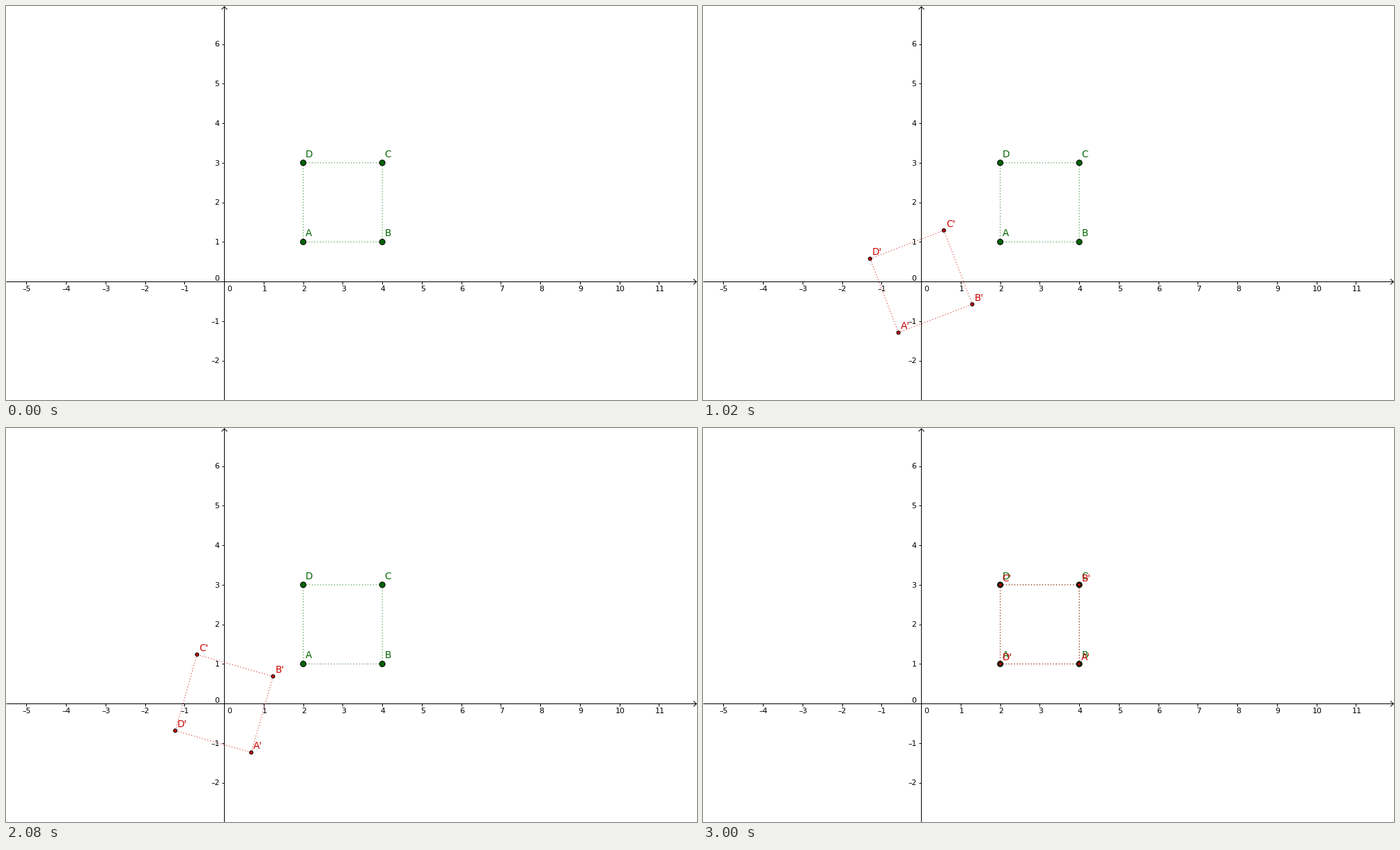
These frames come from a looping animation (992x565 px, 3.02 s). A matplotlib script:

```python
import numpy as np
import matplotlib.pyplot as plt
from matplotlib.animation import FuncAnimation
from matplotlib.patches import Circle

W, H, DPI = 992, 565, 64
PX = 72 / DPI                      # one pixel in points
OX, OY, UNIT = 313.2, 395.1, 56.75
GREEN, RED = "#006400", "#cc0000"
MOVE, TURN = 30, 90                # frames per slide, frames for the quarter turn
FRAMES = 2 * MOVE + TURN + 1

plt.rcParams["font.family"] = "DejaVu Sans"
fig = plt.figure(figsize=(W / DPI, H / DPI), dpi=DPI, facecolor="white")
ax = fig.add_axes([0, 0, 1, 1])
ax.set(xlim=(0, W), ylim=(H, 0))
ax.axis("off")


def to_px(pts):
    return np.array([OX, OY]) + np.asarray(pts) * [UNIT, -UNIT]


def stroke(xs, ys):
    ax.plot(xs, ys, color="black", lw=PX, solid_capstyle="butt", zorder=1)


def number(x, y, n, ha):
    ax.text(x, y, str(n).replace("-", "\N{EN DASH}"), size=11 * PX,
            ha=ha, va="baseline", zorder=2)


def draw_axes():
    stroke([0, W], [OY, OY])
    stroke([OX, OX], [0, H])
    stroke([OX - 3.7, OX + 0.3, OX + 4.3], [5, 1, 5])
    stroke([W - 5, W - 1, W - 5], [OY - 3.6, OY + 0.4, OY + 4.4])
    for n in range(-5, 12):
        x = OX + n * UNIT
        if n:
            stroke([x, x], [OY, OY + 3.5])
        number(x + (7.3 if n == 0 else 1.2 if n > 0 else 0.3), 409, n, "center")
    for n in range(-2, 7):
        y = OY - n * UNIT
        if n:
            stroke([OX - 3.5, OX], [y, y])
        number(306.5, y + (3.8 if n else -1), n, "right")


class Square:
    """Four labelled points joined by dotted sides."""

    def __init__(self, names, color, radius, lift, z):
        self.lift = lift
        self.sides = [ax.plot([], [], color=color, lw=PX, ls=(0, (1, 3)),
                              snap=False, zorder=z)[0] for _ in names]
        self.dots = [ax.add_patch(Circle((0, 0), radius, fc=color, ec="black",
                                         lw=PX, zorder=z + 1)) for _ in names]
        self.labels = [ax.text(0, 0, s, color=color, size=13.6 * PX,
                               va="baseline", zorder=z + 2) for s in names]

    def place(self, pts):
        p = to_px(pts)
        for side, a, b in zip(self.sides, p, np.roll(p, -1, axis=0)):
            side.set_data([a[0], b[0]], [a[1], b[1]])
        for dot, label, (x, y) in zip(self.dots, self.labels, p):
            dot.center = x, y
            label.set_position((x + 3, y - self.lift))

    def show(self, on):
        for artist in [*self.sides, *self.dots, *self.labels]:
            artist.set_visible(on)


CORNERS = np.array([[2, 1], [4, 1], [4, 3], [2, 3]], float)
CENTER = CORNERS.mean(axis=0)


def pose(i):
    """Slide the centre to the origin, turn 90 degrees, slide back."""
    out = min(i / MOVE, 1)
    a = np.radians(90 * np.clip((i - MOVE) / TURN, 0, 1))
    back = max((i - MOVE - TURN) / MOVE, 0)
    rot = np.array([[np.cos(a), -np.sin(a)], [np.sin(a), np.cos(a)]])
    return (CORNERS - CENTER) @ rot.T + CENTER * (1 - out + back)


draw_axes()
fixed = Square("ABCD", GREEN, 4, 8, 3)
fixed.place(CORNERS)
image = Square([c + "'" for c in "ABCD"], RED, 2.5, 5.2, 6)


def update(i):
    image.show(i > 0)
    image.place(pose(i))
    return []


anim = FuncAnimation(fig, update, frames=FRAMES, interval=20,
                     init_func=lambda: update(0), repeat=True, repeat_delay=0)
plt.show()
```
